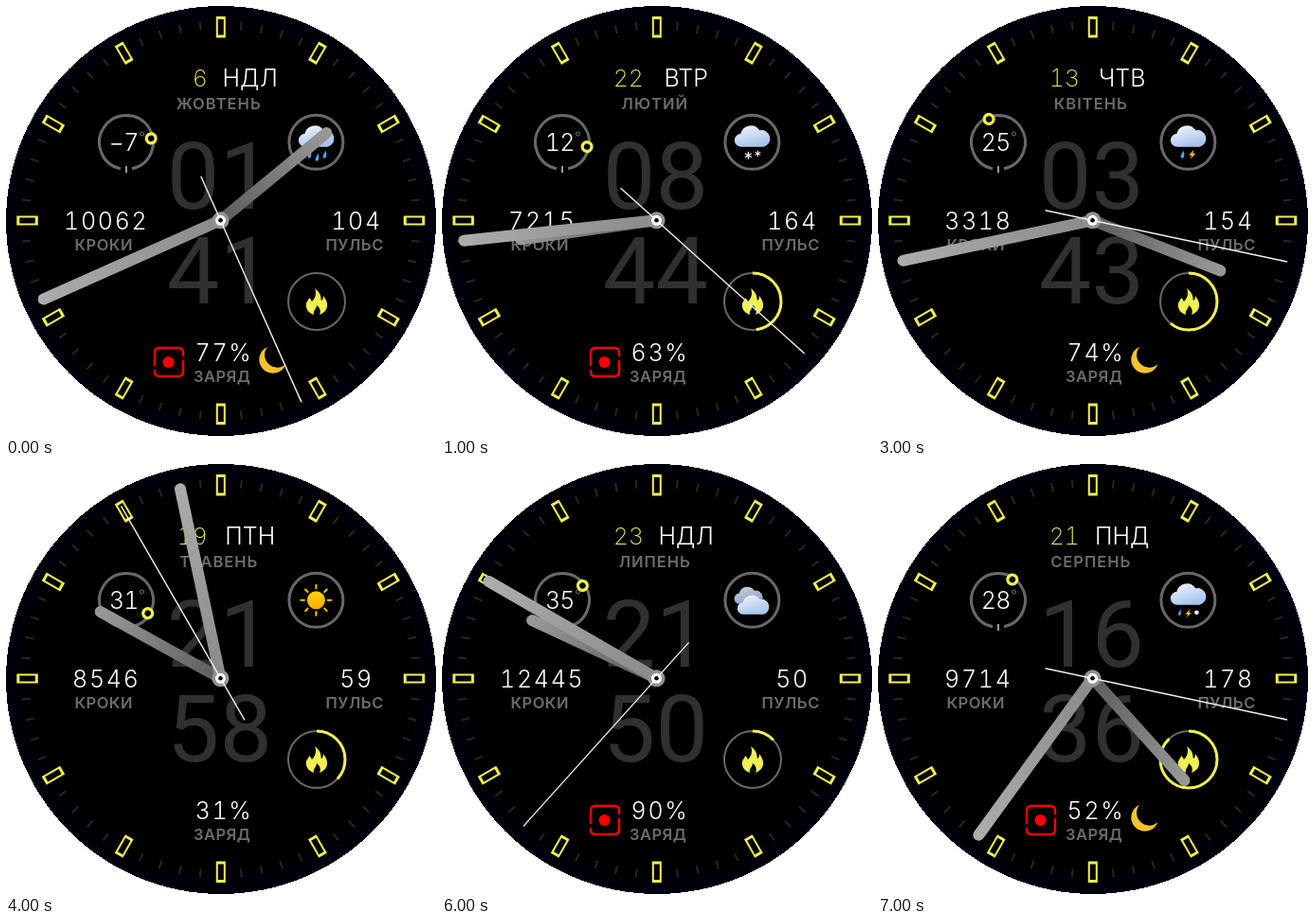
Recreate the animation shown at these times as an HTML page. Size 454x454 px, loop 8 s.

```html
<!DOCTYPE html>
<html lang="uk">
<head>
<meta charset="utf-8">
<title>Watch face</title>
<style>
  html, body { margin: 0; width: 100%; height: 100%; overflow: hidden; background: #fff; }
  svg { display: block; width: 100vw; height: 100vh; }
  text { font-family: Inter, "Liberation Sans", sans-serif; font-optical-sizing: none; text-anchor: middle; font-variant-numeric: tabular-nums; }
  .big { font: 400 99px Roboto, sans-serif; fill: #303030; }
  .val { font-size: 25px; font-weight: 330; fill: #fff; letter-spacing: 1.7px; }
  .label { font-size: 16.5px; font-weight: 600; fill: #6c6c6c; letter-spacing: .5px; }
  .month { letter-spacing: 1px; }
  .day { font-size: 25px; font-weight: 330; fill: #fff; }
  .date { font-size: 25px; font-weight: 250; fill: #f0f050; text-anchor: end; }
  .temp { font-size: 25px; font-weight: 330; fill: #fff; letter-spacing: -.8px; }
  .ring { fill: none; stroke: #686868; stroke-width: 3; }
  .hand { stroke-width: 12; stroke-linecap: round; }
</style>
</head>
<body>
<svg viewBox="0 0 454 454">
  <defs>
    <radialGradient id="faceTone">
      <stop offset=".88" stop-color="#000"/><stop offset="1" stop-color="#00000e"/>
    </radialGradient>
    <linearGradient id="hourTone" gradientUnits="userSpaceOnUse" x1="0" y1="0" x2="0" y2="-145">
      <stop stop-color="#5c5c5c"/><stop offset="1" stop-color="#989898"/>
    </linearGradient>
    <linearGradient id="minTone" gradientUnits="userSpaceOnUse" x1="0" y1="0" x2="0" y2="-205">
      <stop stop-color="#8a8a8a"/><stop offset="1" stop-color="#acacac"/>
    </linearGradient>
    <linearGradient id="cloudTone" x2=".5" y2="1">
      <stop stop-color="#f4f8ff"/><stop offset="1" stop-color="#a8c4ec"/>
    </linearGradient>
    <linearGradient id="sunTone" x2="0" y2="1">
      <stop stop-color="#ffd400"/><stop offset="1" stop-color="#ffa800"/>
    </linearGradient>
    <path id="cloud" fill="url(#cloudTone)" d="M-11 10A7 7 0 0 1-12-4A11 11 0 0 1 8-7.5A8.8 8.8 0 0 1 12 10Z"/>
    <path id="drop" fill="#4aa8f0" d="M1.5-4Q3 4-.5 4Q-4 3 1.5-4Z"/>
    <path id="bolt" fill="#ffc31a" d="M2-5L-3 1H0L-2 5L4-1H1Z"/>
    <path id="flake" stroke="#eef5ff" stroke-width="1.3" d="M0-4V4M-3.5-2L3.5 2M-3.5 2L3.5-2"/>
    <circle id="hail" r="2.4" fill="#d8e8fa"/>
  </defs>

  <circle cx="227" cy="227" r="227" fill="url(#faceTone)" shape-rendering="crispEdges"/>
  <g id="dial" transform="translate(226.8 226.6)"></g>

  <text class="big" id="hh" x="225.5" y="214"/>
  <text class="big" id="mm" x="225.5" y="314"/>

  <text class="date" id="date" x="213" y="85"/>
  <text class="day" id="day" x="257.7" y="85"/>
  <text class="label month" id="month" x="224.8" y="109"/>
  <text class="val" id="steps" x="105.8" y="236"/>
  <text class="label" x="103.2" y="258">КРОКИ</text>
  <text class="val" id="pulse" x="370" y="236"/>
  <text class="label" x="368.2" y="258">ПУЛЬС</text>
  <text class="val" id="power" x="230" y="375"/>
  <text class="label" x="228.2" y="397">ЗАРЯД</text>

  <g transform="translate(127 144)">
    <path class="ring" d="M-6 27.8A28.5 28.5 0 1 1 6 27.8"/>
    <path stroke="#999" stroke-width="2" d="M0 25V32"/>
    <text class="temp" id="temp" x="-2.8" y="9"/>
    <circle cx="16.5" cy="-9" r="2" fill="none" stroke="#777"/>
    <circle id="knob" cy="-26.5" r="4.9" stroke="#f0f050" stroke-width="3.3"/>
  </g>

  <g transform="translate(327.4 143.8)">
    <circle class="ring" r="28.5"/>
    <g id="sky"></g>
  </g>

  <g transform="translate(328 312)">
    <circle class="ring" r="30" style="stroke-width:2"/>
    <circle class="ring" id="burn" r="30" pathLength="100" transform="rotate(-90)" style="stroke:#f0f050"/>
    <path fill="#f0f050" d="M-2-14C6-8 4-3 5-1C7-2 7-5 7-6C11-1 13 5 9 10C7 12 5 13 3 14C5 10 3 6 0 4C0 8-4 9-3 14C-9 12-12 7-11 2C-10-1-8-2-8-4C-6-3-6-1-5 0C-1-4 0-9-2-14Z"/>
  </g>

  <g id="link" fill="none" stroke="#f00" stroke-width="2.4">
    <path d="M157 380V366Q157 361 162 361H182Q187 361 187 366V370M187 374V386Q187 391 182 391H162Q157 391 157 386V384"/>
    <circle cx="171.5" cy="376" r="6" fill="#f00" stroke="none"/>
  </g>
  <path id="moon" fill="#f6c22d" d="M276 360A14.5 14.5 0 1 0 295.5 378A13.3 13.3 0 0 1 276 360Z"/>

  <g transform="translate(226.5 226.3)">
    <path class="hand" id="hour" stroke="url(#hourTone)" d="M0 0V-145"/>
    <path class="hand" id="minute" stroke="url(#minTone)" d="M0 0V-204.5"/>
    <circle r="9" fill="#929292"/>
    <path id="second" stroke="#eee" stroke-width="1.4" d="M0 51V-210"/>
    <circle r="5.5" fill="#fff"/>
    <circle r="2.3"/>
  </g>
</svg>
<script>
const $ = id => document.getElementById(id);
const put = (id, x, y, k = 1) => `<use href="#${id}" transform="translate(${x} ${y}) scale(${k})"/>`;
const cloud = put('cloud', 0, -5);

const skies = {
  rain: cloud + put('drop', -7, 13) + put('drop', 1, 16) + put('drop', 9, 13),
  snow: cloud + put('flake', -4, 14) + put('flake', 6, 12, .8),
  storm: cloud + put('drop', -6, 13) + put('bolt', 4, 13),
  hail: cloud + put('drop', -9, 13, .8) + put('bolt', 0, 14, .9) + put('hail', 9, 13),
  clouds: `<g opacity=".85">${put('cloud', -4, -4, .8)}</g>` + put('cloud', 1, 6, .9),
  sun: '<circle r="9.5" fill="url(#sunTone)"/>' + Array.from({ length: 8 }, (_, i) =>
    `<path d="M0-12.5V-16" stroke="#ffc400" stroke-width="2" stroke-linecap="round" transform="rotate(${i * 45})"/>`).join('')
};

// h, m, s, date, day, month, steps, pulse, power, temp, knob angle, sky, burn %, link, moon
const scenes = [
  [1, 41, 26, 6, 'НДЛ', 'ЖОВТЕНЬ', 10062, 104, 77, '−7', 81, 'rain', 0, 1, 1],
  [8, 44, 22, 22, 'ВТР', 'ЛЮТИЙ', 7215, 164, 63, '12', 100, 'snow', 48, 1, 0],
  [11, 7, 18, 15, 'СРД', 'БЕРЕЗЕНЬ', 11032, 86, 96, '18', 148, 'snow', 74, 0, 0],
  [3, 43, 17, 13, 'ЧТВ', 'КВІТЕНЬ', 3318, 154, 74, '25', -22, 'storm', 61, 0, 1],
  [21, 58, 55, 19, 'ПТН', 'ТРАВЕНЬ', 8546, 59, 31, '31', 121, 'sun', 37, 0, 0],
  [16, 30, 0, 17, 'СБТ', 'ЧЕРВЕНЬ', 6271, 79, 48, '33', 90, 'clouds', 25, 0, 0],
  [21, 50, 37, 23, 'НДЛ', 'ЛИПЕНЬ', 12445, 50, 90, '35', 54, 'clouds', 13, 1, 0],
  [16, 36, 17, 21, 'ПНД', 'СЕРПЕНЬ', 9714, 178, 52, '28', 34, 'hail', 88, 1, 1]
];

$('dial').innerHTML = Array.from({ length: 60 }, (_, i) => {
  const mark = i % 5
    ? '<path d="M0-202V-211" stroke="#262626" stroke-width="2"/>'
    : '<path d="M-5-193H5V-215.5H-5ZM-3-196V-212.5H3V-196Z" fill="#f0f050" fill-rule="evenodd"/>';
  return `<g transform="rotate(${i * 6})">${mark}</g>`;
}).join('');

const pad = n => String(n).padStart(2, '0');
const text = (id, s) => { $(id).textContent = s; };
const turn = (id, deg) => $(id).setAttribute('transform', `rotate(${deg})`);
const show = (id, on) => { $(id).style.display = on ? '' : 'none'; };

function render([h, m, s, date, day, month, steps, pulse, power, temp, knob, sky, burn, link, moon]) {
  text('hh', pad(h));
  text('mm', pad(m));
  text('date', date);
  text('day', day);
  text('month', month);
  text('steps', steps);
  text('pulse', pulse);
  text('power', power + '%');
  text('temp', temp);
  turn('hour', h * 30 + m / 2);
  turn('minute', m * 6);
  turn('second', s * 6);
  turn('knob', knob);
  $('sky').innerHTML = skies[sky];
  $('burn').setAttribute('stroke-dasharray', `${burn} 100`);
  show('burn', burn);
  show('link', link);
  show('moon', moon);
}

let current = -1;
function tick() {
  const i = Math.floor(performance.now() / 1000) % scenes.length;
  if (i !== current) render(scenes[current = i]);
  requestAnimationFrame(tick);
}
tick();
</script>
</body>
</html>
```
